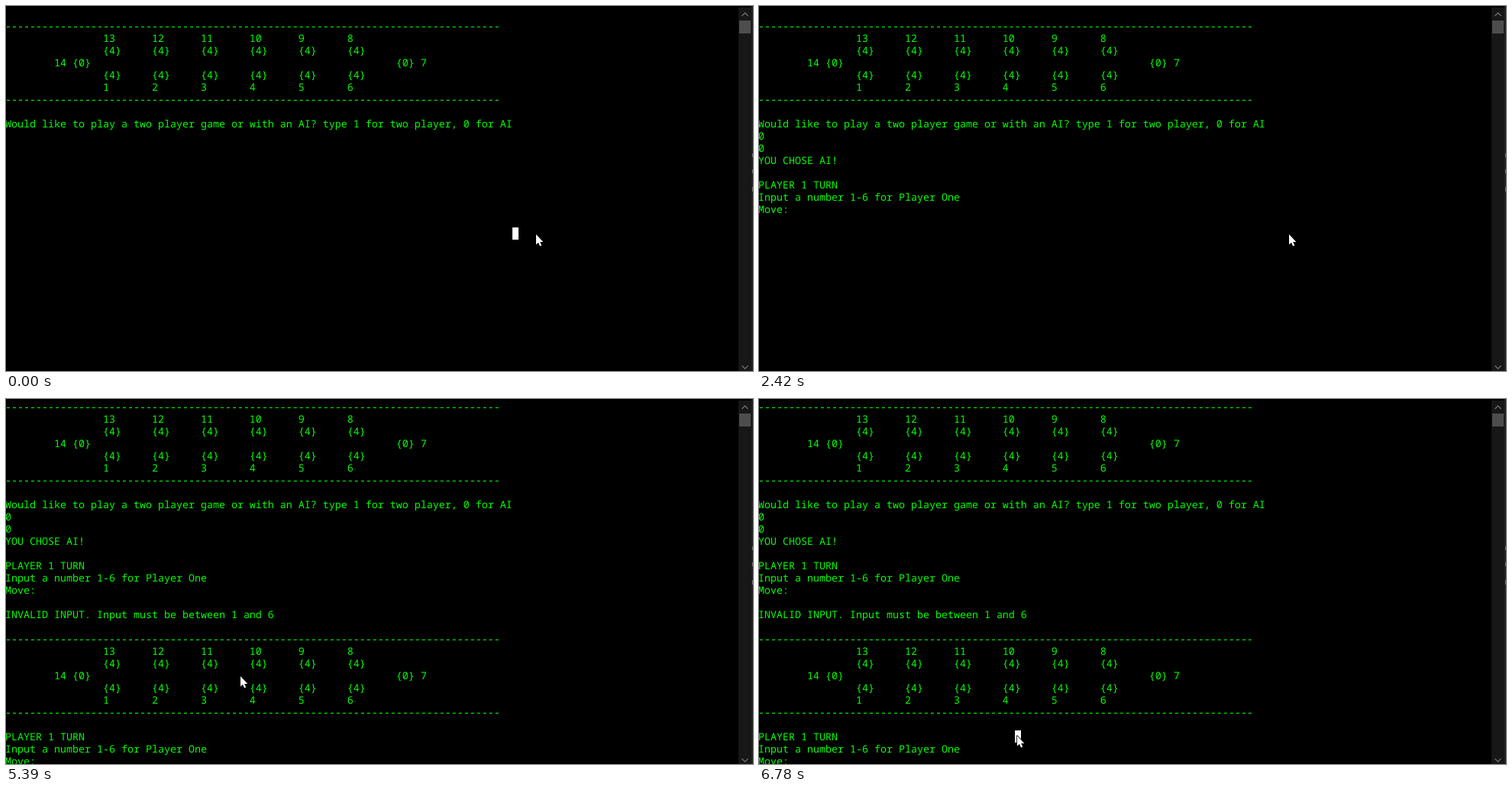
Recreate the animation shown at these times as an HTML page. Size 978 px wide and 478 px high, loop 8000 ms.

```html
<!DOCTYPE html>
<html lang="en">
<head>
<meta charset="utf-8">
<title>Console game</title>
<style>
  html, body { margin: 0; width: 100%; height: 100%; overflow: hidden; background: #000; }
  svg { display: block; width: 978px; height: 478px; background: #000; isolation: isolate; }
  text {
    font: 500 13.3333px "Noto Sans Mono", "DejaVu Sans Mono", monospace;
    font-variant-ligatures: none;
    text-rendering: geometricPrecision;
    white-space: pre;
    fill: #0f0;
  }
  #mark { fill: #fff; mix-blend-mode: difference; }
</style>
</head>
<body>
<svg id="stage" viewBox="0 0 978 478">
  <g id="lines"></g>
  <rect id="caret" width="8" height="4" fill="#fff"/>
  <rect id="mark" height="16"/>
  <g id="scrollbar">
    <rect x="959" y="2" width="17" height="476" fill="#171717"/>
    <rect x="960" y="19" width="15" height="17" fill="#4d4d4d"/>
    <path d="M963.5 13l4-4 4 4M963.5 471l4 4 4-4" fill="none" stroke="#6c6c6c" stroke-width="1.3"/>
  </g>
  <g id="edge">
    <rect x="976" width="2" height="478" fill="#242424"/>
    <path d="M977.5 193v5M977.5 214v5M977.5 237v6" stroke="#777"/>
  </g>
  <path id="mouse" d="M0 0V13.5L3 10.8L5 15.5L7.2 14.5L5.2 10H9.3Z"
        fill="#fff" stroke="#000" stroke-width="1.6" stroke-linejoin="round" paint-order="stroke"/>
</svg>
<script>
const LOOP = 8000, CELL = 8, ROW = 16, LEFT = -1, TOP = 2;
const PROMPT = 10, TYPE_START = 30, TYPE_STEP = 105, BLINK = 530;
const REPLY = 2420, SCROLL = 2450, PRESS = 5650, CLICK = 6780;

const el = id => document.getElementById(id);
const group = el("lines"), caret = el("caret"), mark = el("mark"), mouse = el("mouse");

const rule = "-".repeat(81);
const pits = label => " ".repeat(16) +
  Array.from({ length: 6 }, (_, i) => String(label(i)).padEnd(8)).join("").trimEnd();
const stones = pits(() => "{4}");
const board = [
  rule,
  pits(i => 13 - i),
  stones,
  " ".repeat(8) + "14 {0}" + " ".repeat(50) + "{0} 7",
  stones,
  pits(i => i + 1),
  rule
];
const turn = ["PLAYER 1 TURN", "Input a number 1-6 for Player One", "Move:"];
const lines = [
  "", ...board, "",
  "Would like to play a two player game or with an AI? type 1 for two player, 0 for AI",
  "0", "0", "YOU CHOSE AI!", "",
  ...turn, "",
  "INVALID INPUT. Input must be between 1 and 6", "",
  ...board, "",
  ...turn
];
const greeted = lines.indexOf(turn[0]);
const asked = greeted + turn.length;

const rows = lines.map((line, i) => {
  const node = document.createElementNS("http://www.w3.org/2000/svg", "text");
  node.setAttribute("x", LEFT);
  node.setAttribute("y", TOP + ROW * i + 13);
  node.textContent = line;
  return group.appendChild(node);
});

const clamp = (v, lo, hi) => Math.min(hi, Math.max(lo, v));
const show = (node, on) => node.setAttribute("visibility", on ? "visible" : "hidden");

function place(node, x, y) {
  node.setAttribute("x", x);
  node.setAttribute("y", y);
}

const easeIn = k => k * k;
const easeOut = k => 1 - (1 - k) ** 2;
const easeBoth = k => k * k * (3 - 2 * k);

// Each move starts where the one before it ended.
const moves = [
  { start: 5030, end: 5590, from: [692, 301], to: [251, 372], ease: easeOut },
  { start: PRESS, end: 5890, from: [251, 372], to: [307, 379], ease: easeIn },
  { start: 6500, end: 6770, from: [307, 379], to: [338, 441], ease: easeBoth }
];

function pointer(t) {
  const move = moves.filter(m => m.start <= t).pop();
  if (!move) return [694, 299];
  const k = move.ease(clamp((t - move.start) / (move.end - move.start), 0, 1));
  return move.from.map((v, i) => Math.round(v + (move.to[i] - v) * k));
}

// Selected cells as [column, row, count]
function selection(t, x) {
  if (t < TYPE_START) return [83, 18, 1];
  if (t >= CLICK) return [42, 27, 1];
  if (t < PRESS) return [0, 0, 0];
  const last = Math.min(38, Math.floor((x - LEFT) / CELL));
  return [31, 23, last - 30];
}

// Two answers are typed, each a key followed by Enter.
function drawConsole(t) {
  const step = clamp(Math.floor((t - TYPE_START) / TYPE_STEP), 0, 4);
  const done = step === 4;
  let count = done ? greeted : PROMPT + Math.ceil(step / 2);
  if (t >= REPLY) count = asked;
  if (t >= SCROLL) count = lines.length;
  rows.forEach((node, i) => show(node, i < count));
  group.setAttribute("transform", `translate(0 ${t < SCROLL ? 0 : -ROW})`);

  const line = done ? greeted : PROMPT + Math.floor(step / 2);
  place(caret, LEFT + CELL * (step % 2), TOP + ROW * line + 12);
  const lit = t < 2 * BLINK + 20 || Math.floor((t - 20) / BLINK) % 2 === 1;
  show(caret, t >= TYPE_START && t < REPLY && lit);
}

function draw(t) {
  drawConsole(t);
  const [x, y] = pointer(t);
  mouse.setAttribute("transform", `translate(${x} ${y})`);

  const [col, row, cells] = selection(t, x);
  place(mark, LEFT + CELL * col, TOP + ROW * row);
  mark.setAttribute("width", CELL * cells);
}

const start = performance.now();
function tick() {
  draw((performance.now() - start) % LOOP);
  requestAnimationFrame(tick);
}
draw(0);
requestAnimationFrame(tick);
</script>
</body>
</html>
```
